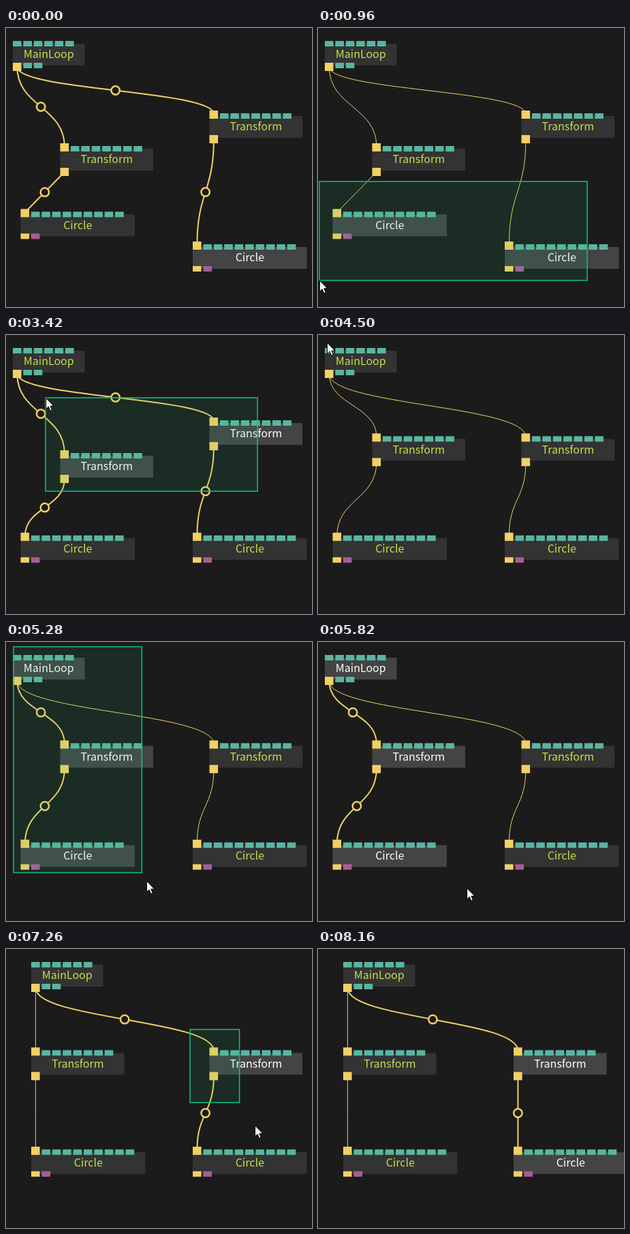
Recreate the animation shown at these times as an HTML page with a canvas. Size 449 by 409 pixels, loop 8880 ms.

```html
<!DOCTYPE html>
<html lang="en">
<head>
<meta charset="utf-8">
<style>
html, body { margin: 0; width: 449px; height: 409px; overflow: hidden; background: #1b1b1b; }
canvas { display: block; }
</style>
</head>
<body>
<canvas id="stage" width="449" height="409"></canvas>
<script>
const ctx = document.getElementById('stage').getContext('2d');
const LOOP = 8880, STEP = 60, H = 32;
const BG = '#1b1b1b', YELLOW = '#f1d064', TEAL = '#5ab5a0', PURPLE = '#a85c98';

// Ports from left to right: y = yellow, t = teal, p = purple
const kinds = {
  MainLoop:  { w: 105.5, top: 't'.repeat(6),       bottom: 'ytt' },
  Transform: { w: 136.5, top: 'y' + 't'.repeat(7), bottom: 'y' },
  Circle:    { w: 167.5, top: 'y' + 't'.repeat(9), bottom: 'yp' }
};
const node = (name, x, y) => ({ name, x, y, ...kinds[name] });
const nodes = [
  node('MainLoop', 10, 23),
  node('Transform', 79.5, 177),
  node('Circle', 21.5, 273.3),
  node('Transform', 298.5, 129),
  node('Circle', 274, 321)
];
const links = [[0, 1], [0, 3], [1, 2], [3, 4]];

// The cursor passes `via`, drags a marquee, rests, then the selection is aligned
const drags = [
  { via: [470, 195], from: [395, 225], to: [2, 370], rest: [40, 383],
    press: 300, end: 900, align: 1740, axis: 'y', value: 297.8 },
  { via: [359, 199], from: [369, 229], to: [58, 92], rest: [68, 98],
    press: 2580, end: 3360, align: 3720, axis: 'y', value: 152.3 },
  { via: [30, 40], from: [11, 7], to: [209, 355], rest: [222, 363],
    press: 4440, end: 5340, align: 6060, axis: 'x', value: 37 },
  { via: [313, 128], from: [270, 118], to: [438, 366], rest: [442, 354],
    press: 6900, end: 7560, align: 7920, axis: 'x', value: 287 }
];
const path = drags.flatMap(d => [
  [d.press - 400, d.via], [d.press, d.from], [d.end, d.to], [d.align, d.rest]
]).concat([[8160, [470, 300]], [LOOP, [470, 300]]]);

function cursorAt(t) {
  const i = path.findIndex(([time]) => time > t);
  const [t0, a] = path[i - 1], [t1, b] = path[i];
  const u = (t - t0) / (t1 - t0), e = u * u * (3 - 2 * u);
  return a.map((v, k) => v + (b[k] - v) * e);
}

const release = drag => drag.end + 120;

// The marquee trails the cursor by one step
function marquee(drag, t) {
  const time = Math.max(drag.press, Math.min(t, release(drag)) - STEP);
  const [x0, y0] = drag.from, [x1, y1] = cursorAt(Math.min(time, drag.end));
  return { l: Math.min(x0, x1), t: Math.min(y0, y1), r: Math.max(x0, x1), b: Math.max(y0, y1) };
}

const touches = (n, box) => n.x < box.r && n.x + n.w > box.l && n.y < box.b && n.y + H > box.t;

// Replays every drag up to time t
function layout(t) {
  const ops = nodes.map((n, i) => ({ ...n, picked: i === 4, active: true }));
  for (const drag of drags.filter(d => t >= d.press)) {
    const box = marquee(drag, t), aligned = t >= drag.align;
    for (const op of ops) {
      op.picked = touches(op, box);
      op.active = op.picked && (aligned || op.name === 'Transform');
    }
    if (aligned) for (const op of ops) if (op.picked) op[drag.axis] = drag.value;
  }
  return ops;
}

function drawLink(a, b) {
  const thick = a.active || b.active;
  const x1 = a.x + 6.4, x2 = b.x + 6.4, y1 = a.y + 34, y2 = b.y - 3;
  const mx = (x1 + x2) / 2, my = (y1 + y2) / 2;
  ctx.beginPath();
  ctx.moveTo(x1, y1);
  if (b.y - a.y - H < 70) ctx.lineTo(x2, y2);
  else ctx.bezierCurveTo(x1, my, x2, my, x2, y2);
  ctx.strokeStyle = YELLOW;
  ctx.lineWidth = thick ? 2 : 1;
  ctx.stroke();
  if (!thick) return;
  ctx.beginPath();
  ctx.arc(mx, my, 6.2, 0, 7);
  ctx.fillStyle = BG;
  ctx.fill();
  ctx.lineWidth = 2.5;
  ctx.stroke();
}

function drawPorts(op, ports, isTop) {
  [...ports].forEach((c, i) => {
    const linked = c === 'y' && (isTop || op.name !== 'Circle');
    const h = linked ? 12 : 8;
    ctx.fillStyle = { y: YELLOW, t: TEAL, p: PURPLE }[c];
    ctx.fillRect(op.x + i * 15.4, isTop ? op.y + 4 - h : op.y + H - 4, 12.6, h);
  });
}

function drawNode(op) {
  ctx.fillStyle = op.picked ? '#444' : '#333';
  ctx.fillRect(op.x, op.y, op.w, H);
  drawPorts(op, op.top, true);
  drawPorts(op, op.bottom, false);
  ctx.fillStyle = op.picked ? '#fff' : '#c5e04a';
  ctx.fillText(op.name, op.x + op.w / 2, Math.round(op.y + 21.4));
}

function drawMarquee({ l, t, r, b }) {
  ctx.fillStyle = 'rgba(30,190,120,.1)';
  ctx.strokeStyle = '#12c082';
  ctx.lineWidth = 1.5;
  ctx.fillRect(l, t, r - l, b - t);
  ctx.strokeRect(l, t, r - l, b - t);
}

const arrow = new Path2D('M0 0V16L3.6 12.6L6.2 18.6L8.8 17.5L6.3 11.6H11.3Z');
function drawCursor([x, y]) {
  ctx.save();
  ctx.translate(x, y);
  ctx.fillStyle = '#fff';
  ctx.strokeStyle = '#000';
  ctx.lineWidth = 1;
  ctx.fill(arrow);
  ctx.stroke(arrow);
  ctx.restore();
}

function draw(t) {
  const ops = layout(t);
  const held = drags.find(d => t >= d.press && t <= release(d));
  ctx.fillStyle = BG;
  ctx.fillRect(0, 0, 449, 409);
  ctx.font = '16px "Noto Sans CJK JP", "Noto Sans CJK SC", "Noto Sans CJK", "Open Sans", sans-serif';
  ctx.textAlign = 'center';
  links.forEach(([a, b]) => drawLink(ops[a], ops[b]));
  ops.forEach(drawNode);
  if (held) drawMarquee(marquee(held, t));
  if (t >= STEP) drawCursor(cursorAt(t));
}

const start = performance.now();
function tick() {
  const t = (performance.now() - start) % LOOP;
  draw(Math.floor(t / STEP) * STEP);
  requestAnimationFrame(tick);
}
tick();
</script>
</body>
</html>
```
